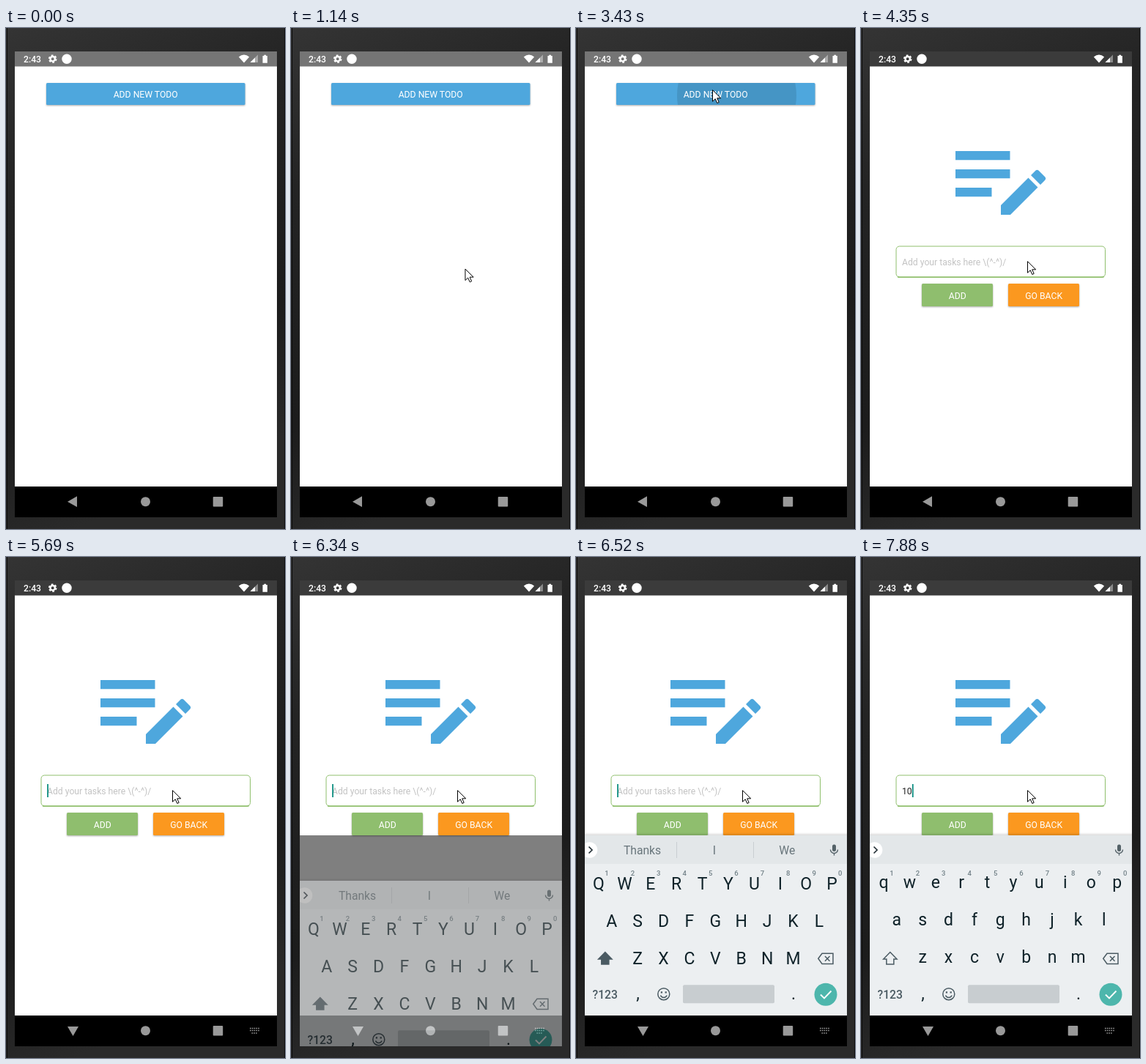
These frames come from a looping animation (381 by 684 pixels, 8 s). An HTML page:

```html
<!DOCTYPE html>
<html lang="en">
<head>
<meta charset="utf-8">
<title>Todo app</title>
<style>
  html, body { margin: 0; height: 100%; overflow: hidden; background: #1f1f1f; }
  svg { display: block; width: 100%; height: 100%; }
  text { font-family: Roboto, Arial, sans-serif; font-size: 12.2px; }
  .mid { text-anchor: middle; }
  .btn { filter: drop-shadow(0 1px 1.2px #0005); }
  .word { font-size: 15.7px; fill: #68757b; }
  .key { font-size: 23px; fill: #0f2229; }
  .hint { font-size: 9.5px; font-weight: 500; fill: #718087; }
</style>
</head>
<body>
<svg viewBox="0 0 381 684" preserveAspectRatio="none">
  <defs>
    <linearGradient id="bezel" x2=".25" y2="1">
      <stop offset="0" stop-color="#343434"/>
      <stop offset=".3" stop-color="#242424"/>
      <stop offset=".75" stop-color="#1c1c1c"/>
      <stop offset="1" stop-color="#2a2a2a"/>
    </linearGradient>
    <linearGradient id="shade" x2="0" y2="1">
      <stop offset="0" stop-opacity="0"/>
      <stop offset="1" stop-opacity=".14"/>
    </linearGradient>
    <clipPath id="screen"><rect x="12" y="32" width="358" height="636"/></clipPath>
    <clipPath id="button"><rect x="55" y="75" width="271.5" height="30" rx="1.5"/></clipPath>
  </defs>

  <rect width="381" height="684" fill="url(#bezel)"/>
  <path d="M1.5 0V684M380.5 0V684" stroke="#0c0c0c"/>

  <!-- home -->
  <rect x="12" y="32" width="358" height="594" fill="#fff"/>
  <rect x="12" y="32" width="358" height="20.5" fill="#757575"/>
  <rect class="btn" x="55" y="75" width="271.5" height="30" rx="1.5" fill="#4ea7dd"/>
  <circle id="ripple" cx="219.5" cy="92" r="81.5" fill="#000" fill-opacity=".11" clip-path="url(#button)"/>
  <text class="mid" x="190.7" y="95" fill="#fff">ADD NEW TODO</text>

  <!-- new task -->
  <g id="modal">
    <rect x="12" y="32" width="358" height="594" fill="#fff"/>
    <rect x="12" y="32" width="358" height="20.5" fill="#3b3b3b"/>
    <path fill="#4ea7dd" d="M129 168h74.500v12.300h-74.500zM129 193h74.500v12.300h-74.500zM129 218h49.500v12.300h-49.500z
      M191 255V242L228.500 204.500 241.500 217.500 204 255zM232 201L238 195Q240.500 192.500 243 195L251 203Q253.500 205.500 251 208L245 214z"/>
    <rect x="48" y="298" width="285.500" height="42" rx="4.500" fill="#fff" stroke="#8fbf6c"/>
    <path d="M50 339.500Q51 340.200 53 340.200H328.500Q331 340.200 332 339.300" fill="none" stroke="#8fbf6c" stroke-width="1.600"/>
    <text id="entry" x="56" y="324"></text>
    <rect class="btn" x="83" y="349" width="97" height="31" rx="1.500" fill="#8fbe6e"/>
    <rect class="btn" x="201" y="349" width="97" height="31" rx="1.500" fill="#fb981f"/>
    <text class="mid" x="131.700" y="369.600" fill="#fff">ADD</text>
    <text class="mid" x="249.700" y="369.600" fill="#fff">GO BACK</text>
    <rect id="caret" y="310" width="1.700" height="18" fill="#00897b"/>
  </g>

  <!-- status icons -->
  <g fill="#fff">
    <text x="24" y="46.600" font-weight="500">2:43</text>
    <g fill="none" stroke="#fff">
      <circle cx="63.700" cy="42.200" r="3.200" stroke-width="2.400"/>
      <circle cx="63.700" cy="42.200" r="4.900" stroke-width="1.800" stroke-dasharray="2.730 2.400"/>
    </g>
    <circle cx="83" cy="42.200" r="6.700"/>
    <path d="M317.800 39.500Q325 33.700 332.200 39.500L325 47.500z"/>
    <path d="M344 36.500V47H333.500z" fill-opacity=".4"/>
    <path d="M340 40.500V47H333.500z"/>
    <path d="M350.500 38h1.800v-1.300h2.800v1.300h1.800v9.800h-6.400z"/>
  </g>

  <!-- navigation bar -->
  <rect x="12" y="626" width="358" height="42" fill="#000"/>
  <g fill="#999">
    <path id="back"/>
    <circle cx="190.500" cy="646.700" r="6.500"/>
    <rect x="282.700" y="640" width="13.500" height="13.500" rx="1"/>
    <path id="switcher" d="M333 643.500h13M333 646.500h13M335.500 650h8" stroke="#999" stroke-width="1.500" stroke-dasharray="1.600 1.200"/>
  </g>

  <!-- keyboard -->
  <g clip-path="url(#screen)">
    <rect id="dim" x="12" y="380" width="358" height="246"/>
    <g id="board">
      <rect x="12" y="376" width="358" height="4" fill="url(#shade)"/>
      <rect x="12" y="380" width="358" height="246" fill="#eceff1"/>
      <rect x="12" y="380" width="358" height="39" fill="#e3e7e9"/>
      <circle cx="18.500" cy="400" r="10.800" fill="#fff"/>
      <path d="M17.500 395.500l4.500 4.500-4.500 4.500" fill="none" stroke="#263238" stroke-width="1.700"/>
      <g id="words">
        <text class="word mid" x="90.500" y="405.700">Thanks</text>
        <text class="word mid" x="189" y="405.700">I</text>
        <text class="word mid" x="288.300" y="405.700">We</text>
        <path d="M137.500 389V411M242.500 389V411" stroke="#c9ced1"/>
      </g>
      <rect x="350" y="392.500" width="5" height="9.500" rx="2.500" fill="#546268"/>
      <path d="M347.500 399.500a5 5 0 0 0 10 0M352.500 404.500v3" fill="none" stroke="#546268" stroke-width="1.400"/>
      <g id="keys"></g>
      <path id="shift" d="M39.800 539.500L49 549H44.800V556H34.800V549H30.600z" stroke="#4b5b63" stroke-width="1.500"/>
      <path d="M330.800 548.300L336 541.300H351V555.500H336zM340 545l6.500 6.700M346.500 545l-6.500 6.700" fill="none" stroke="#4b5b63" stroke-width="1.500"/>
      <text class="mid" x="39.700" y="602.500" font-weight="500" style="font-size:15.700px" fill="#4b5b63">?123</text>
      <text class="key mid" x="84.500" y="604">,</text>
      <text class="key mid" x="297" y="604">.</text>
      <g fill="none" stroke="#4b5b63" stroke-width="1.500">
        <circle cx="119.800" cy="596.700" r="8"/>
        <path d="M115.500 598.500a4.600 4.600 0 0 0 8.600 0"/>
        <path d="M115.800 594.300h2.200M121.600 594.300h2.200" stroke-width="2.200"/>
      </g>
      <rect x="146" y="584.300" width="125" height="25" rx="2" fill="#c8cdd0"/>
      <circle cx="341" cy="597.300" r="15.500" fill="#4db6ac"/>
      <path d="M334 597.500l5 5 9.500-10" fill="none" stroke="#fff" stroke-width="1.900"/>
    </g>
  </g>

  <circle id="click" r="12" fill="#ff0" fill-opacity=".47"/>
  <path id="cursor" d="M.5 .7V16.200L4.200 12.700 6.800 18.500 9.200 17.400 6.700 11.800H11.700z" fill="#fff" stroke="#000"/>
</svg>
<script>
const $ = id => document.getElementById(id);
const show = (id, on) => $(id).setAttribute('visibility', on ? 'visible' : 'hidden');
const set = (id, attrs) => { for (const k in attrs) $(id).setAttribute(k, attrs[k]); };
const mix = (a, b, p) => a + (b - a) * p;
const within = (t, a, b) => t >= a && t < b;

// Number of picture steps (0..n) shown by time t, the first at a, the last at b.
const steps = (t, a, b, n) =>
  t < a ? 0 : Math.min(n, Math.floor((t - a) / (b - a) * (n - 1) + 1e-6) + 1);

const PITCH = 35.4;
const rows = [['QWERTYUIOP', 31, 454], ['ASDFGHJKL', 48.7, 505], ['ZXCVBNM', 84.1, 556]];
const keys = [];

function addText(cls, x, y, str) {
  const el = document.createElementNS('http://www.w3.org/2000/svg', 'text');
  el.setAttribute('class', cls + ' mid');
  el.setAttribute('x', x);
  el.setAttribute('y', y);
  el.textContent = str;
  $('keys').append(el);
  return el;
}

rows.forEach(([letters, x0, y], row) => [...letters].forEach((letter, i) => {
  const x = x0 + i * PITCH;
  keys.push({ el: addText('key', x, y, letter), letter, y });
  if (!row) addText('hint', x + 11, 434.7, (i + 1) % 10);
}));

function cursorAt(t) {
  if (t < 1660) {
    const p = Math.max(0, steps(t, 910, 1470, 13) - 1) / 12;
    const e = 1 - (1 - p) ** 2;
    return [mix(303, 185, e), mix(650, 71, e)];
  }
  if (t < 4170) {
    const p = steps(t, 1660, 1940, 5) / 5;
    return [mix(185, 186, p), mix(71, 84, p)];
  }
  const p = steps(t, 4170, 4350, 5) / 5;
  return [mix(186, 227, p), mix(84, 318, p)];
}

function drawKeyboard(t) {
  const k = steps(t, 6340, 6520, 3);
  const alpha = [0, .5, .85, 1][k], drop = [62, 62, 18, 0][k];
  set('dim', { opacity: alpha });
  set('board', { opacity: alpha, transform: `translate(0 ${drop})` });
  const lower = t >= 7510;
  for (const { el, letter, y } of keys) {
    el.textContent = lower ? letter.toLowerCase() : letter;
    el.setAttribute('y', lower ? y - 2.5 : y);
  }
  set('shift', { fill: lower ? 'none' : '#4b5b63' });
  $('words').style.display = t < 7650 ? '' : 'none';
}

function draw(t) {
  const [x, y] = cursorAt(t);
  set('cursor', { transform: `translate(${x} ${y})` });
  show('cursor', t >= 910);
  set('click', { cx: x, cy: y });
  show('click', within(t, 2460, 2600) || within(t, 4680, 4820));
  show('ripple', within(t, 3430, 3940));
  set('modal', { opacity: steps(t, 3710, 3940, 4) / 4 });

  const typed = '10'.slice(0, t < 7420 ? 0 : t < 7880 ? 1 : 2);
  $('entry').textContent = typed || 'Add your tasks here \\(^-^)/';
  set('entry', { fill: typed ? '#222' : '#c3c3c3' });
  set('caret', { x: 56.2 + typed.length * 6.85 });
  show('caret', within(t, 5140, 7150) || t >= 7420);

  const open = t >= 5690;
  set('back', { d: open ? 'M84 641H99L91.500 654z' : 'M84 646.700L97 639.300V654z' });
  show('switcher', open);
  drawKeyboard(t);
}

function frame() {
  draw(performance.now() % 8000);
  requestAnimationFrame(frame);
}
frame();
</script>
</body>
</html>
```
